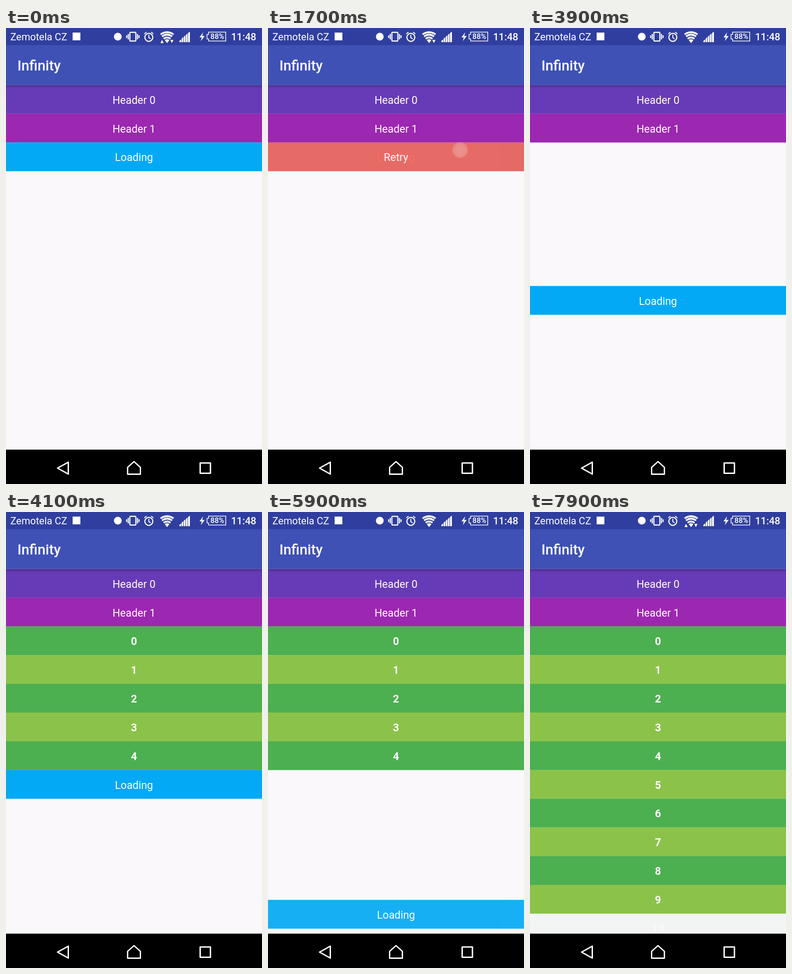
Animation, 561 px wide and 998 px high, one loop 8 s. Source, as an HTML page:

```html
<!DOCTYPE html>
<html lang="en">
<head>
<meta charset="utf-8">
<title>Infinity</title>
<style>
  html, body { margin: 0; height: 100%; overflow: hidden; background: #faf8fb; }
  svg { display: block; width: 100vw; height: 100vh; font-family: Roboto, sans-serif; fill: #fff; }
  .row text { font-size: 23.37px; text-anchor: middle; }
  .line { fill: none; stroke: #fff; }
</style>
</head>
<body>
<svg viewBox="0 0 561 998">
  <defs>
    <linearGradient id="shade" x2="0" y2="1">
      <stop stop-opacity=".32"/><stop offset=".4" stop-opacity=".1"/><stop offset="1" stop-opacity="0"/>
    </linearGradient>
    <radialGradient id="glow">
      <stop stop-color="#fff" stop-opacity=".5"/>
      <stop offset=".75" stop-color="#fff" stop-opacity=".4"/>
      <stop offset="1" stop-color="#fff" stop-opacity="0"/>
    </radialGradient>
  </defs>
  <rect width="561" height="998" fill="#faf8fb"/>
  <g id="list"></g>
  <circle id="touch" cx="421" cy="267" r="19" fill="url(#glow)"/>

  <rect y="124.5" width="561" height="9" fill="url(#shade)"/>
  <rect width="561" height="124.7" fill="#3f51b5"/>
  <rect width="561" height="37.6" fill="#303f9f"/>
  <text x="24.9" y="93" font-size="31.17" font-weight="500">Infinity</text>

  <!-- status bar -->
  <text x="9.5" y="27" font-size="21.8">Zemotela CZ</text>
  <rect x="146" y="10" width="17" height="17"/>
  <circle cx="245" cy="19" r="8.5"/>
  <g class="line" stroke-width="2.4">
    <rect x="271.5" y="9.5" width="13" height="19" rx="1"/>
    <path d="M268 13v12M264.5 16v6M288 13v12M291.5 16v6"/>
    <circle cx="313" cy="20.5" r="8.7"/>
    <path d="M313 15v6l4 3M303 13l5-4M323 13l-5-4" stroke-width="2"/>
  </g>
  <path d="M353 33l-5-6.5q5-4 10 0z"/>
  <path class="line" stroke-width="3.8" d="M345.5 23.5q7.5-5.5 15 0M342 18.5q11-8 22 0M338.8 14q14.2-9.5 28.4 0"/>
  <g stroke="#303f9f" stroke-width="1.5" paint-order="stroke">
    <path id="up" d="M338.5 33l3.5-7 3.5 7z"/>
    <path id="down" d="M360 26h7l-3.5 7z"/>
  </g>
  <path d="M380 31v-3l4-3v6zM385 31v-8l3.5-3v11zM389.7 31v-12l3.5-3v15zM394.4 31v-16l3.5-3v19zM399 31v-20l4-3v23z"/>
  <path d="M432 9.5l-8 11h5l-2 8 8.500-11h-5.500z"/>
  <path class="line" stroke-width="1.6" d="M444 9h37.500v19.500H444v-4.500h-3.500v-10H444z"/>
  <text x="463" y="24.300" font-size="16" font-weight="500" text-anchor="middle">88%</text>
  <text x="548.5" y="27" font-size="21.8" font-weight="500" text-anchor="end">11:48</text>

  <!-- navigation bar -->
  <rect y="922.8" width="561" height="76" fill="#000"/>
  <g class="line" stroke-width="3" stroke-linejoin="round">
    <path d="M113 963.300l23.500-13v26z"/>
    <path d="M280.500 949l14 12.500v15h-28v-15z"/>
    <rect x="425.500" y="952" width="22.500" height="22.500"/>
  </g>
</svg>
<script>
const TOP = 124.67, ROW = 62.85, LOOP = 8000;
const $ = id => document.getElementById(id);

function addRow(label, color, place, weight = 400) {
  const g = document.createElementNS('http://www.w3.org/2000/svg', 'g');
  g.setAttribute('class', 'row');
  g.innerHTML = `<rect width="561" height="${ROW + .2}" fill="${color}"/>
    <text x="280.5" y="41" font-weight="${weight}">${label}</text>`;
  $('list').append(g);
  move(g, place);
  return g;
}
function move(g, place) {
  g.setAttribute('transform', `translate(0 ${TOP + ROW * place})`);
}
function show(el, alpha) {
  el.setAttribute('opacity', alpha);
}

addRow('Header 0', '#673ab7', 0);
addRow('Header 1', '#9c27b0', 1);
const items = Array.from({ length: 11 }, (_, k) =>
  addRow(k, k % 2 ? '#8bc34a' : '#4caf50', k + 2, 700));
const fresh = addRow('Loading', '#03a9f4', 2);
const retry = addRow('Retry', '#f44336', 2);
const stale = addRow('Loading', '#03a9f4', 2);

const clamp = x => Math.min(1, Math.max(0, x));
const ease = (t, start, length) => .5 - Math.cos(Math.PI * clamp((t - start) / length)) / 2;

const FAIL = 460, TAP = 1500, RELOAD = 1617, PAGE1 = 3650, PAGE2 = 5700, PAGE3 = 7765;
const SWAP = 250, FADE = 120;

function render(t) {
  const swap = start => ease(t, start, SWAP);
  const fade = start => ease(t, start, FADE);

  // A changed row fades in below its old copy, which fades out
  const current = t < PAGE1 ? RELOAD : t < PAGE2 ? PAGE1 : PAGE2;
  show(fresh, t < TAP ? 0 : swap(current) * (1 - fade(PAGE3)));
  show(stale, t < TAP ? 1 - swap(FAIL) : t < PAGE1 ? 0 : 1 - swap(current));
  show(retry, t < TAP ? swap(FAIL) : 1 - swap(RELOAD));

  const place = 2 + 5 * (swap(PAGE1) + swap(PAGE2));
  move(fresh, place);
  move(stale, place);

  items.forEach((g, k) =>
    show(g, fade(k < 5 ? PAGE1 + SWAP : k < 10 ? PAGE2 + SWAP : PAGE3 + FADE)));

  show($('touch'), t < TAP ? 0 : 1 - clamp((t - 1610) / 200));
  show($('up'), +(t < 1000 || t >= 7000));
  show($('down'), +(t < 2000 || t >= 7000));
}

const begin = performance.now();
function tick() {
  const t = (performance.now() - begin) % LOOP;
  render(Math.floor(t / 100) * 100);
  requestAnimationFrame(tick);
}
tick();
</script>
</body>
</html>
```
